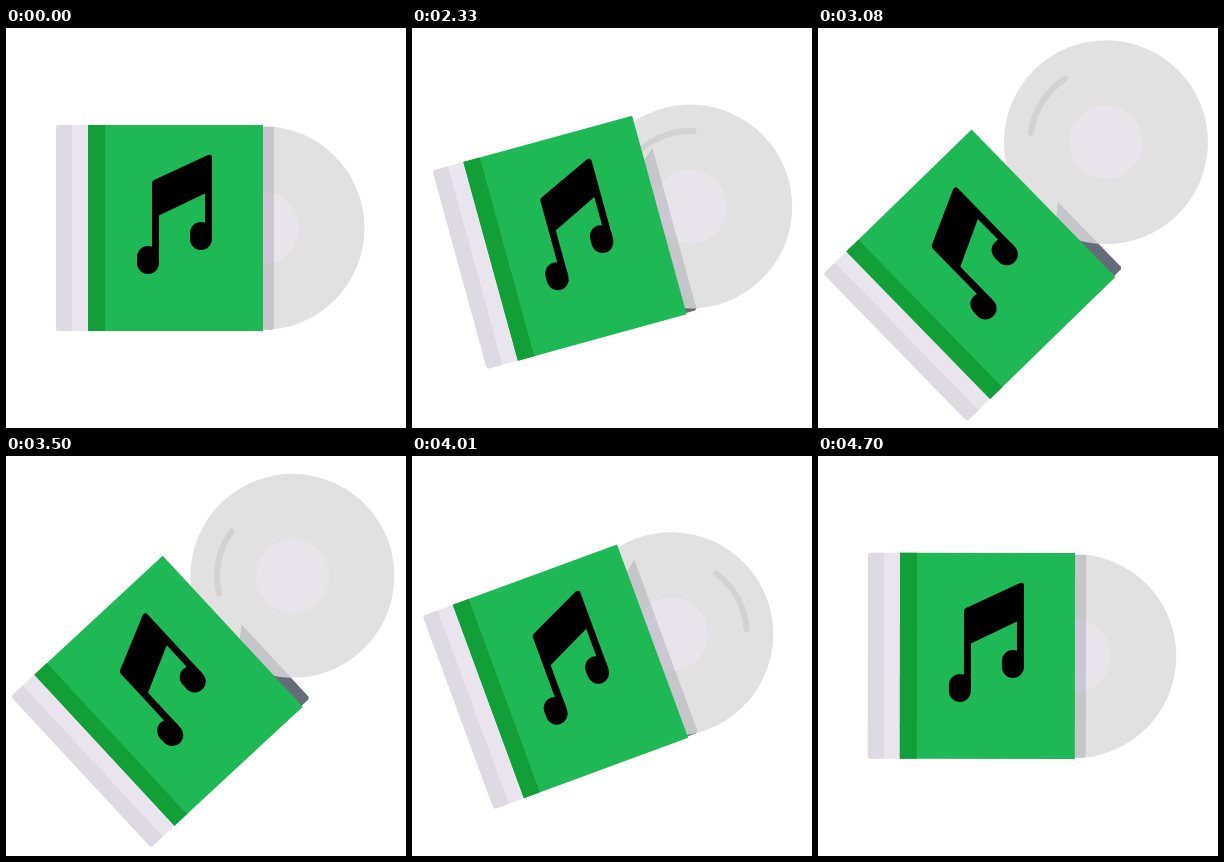
Animation, 400 px wide and 400 px high, one loop 4730 ms. Source, as an HTML page:

```html
<!DOCTYPE html>
<html lang="en">
<head>
<meta charset="utf-8">
<title>Album</title>
<style>
  html, body { margin: 0; width: 100%; height: 100%; overflow: hidden; background: #fff; }
  svg { display: block; width: 100%; height: 100%; }
</style>
</head>
<body>
<svg viewBox="0 0 400 400">
  <g id="album">
    <path id="back" fill="#646b79"/>
    <g id="disc" opacity=".815">
      <circle r="102" fill="#dbdbdb"/>
      <circle r="36.7" fill="#e4dee8"/>
      <path id="shine" d="M75.5 0A75.5 75.5 0 0 1 48.5 57.8" fill="none" stroke="#c9c9c9" stroke-width="6" stroke-linecap="round"/>
    </g>
    <g id="case">
      <path d="M83 97H53q-3 0-3 3V300q0 3 3 3H83Z" fill="#e9e4ed"/>
      <path d="M66 97H53q-3 0-3 3V300q0 3 3 3H66Z" fill="#dfd9e3"/>
      <path d="M82 97H257V303H82Z" fill="#1eb954"/>
      <path d="M82 97H99V303H82Z" fill="#139f37"/>
      <path d="M146 155q0-2 2-3L202 127q4-1 4 3V210h-7V165.500L153 187.500V233h-7Z"/>
      <rect x="131" y="218" width="22" height="28" rx="11"/>
      <rect x="184" y="194" width="22" height="28" rx="11"/>
    </g>
  </g>
</svg>
<script>
const LOOP = 4730;
const times = [2030, 2335, 2540, 2600, 2792, 3110, 3620, 3800, 4160, 4190, 4380, 4730];

// Smooth track through its keys; flat at both ends and at every peak.
function track(values) {
  const slope = i => (values[i + 1] - values[i]) / (times[i + 1] - times[i]);
  const tangents = values.map((_, i) => {
    if (i === 0 || i === values.length - 1) return 0;
    const a = slope(i - 1), b = slope(i);
    return a * b > 0 ? 2 * a * b / (a + b) : 0;
  });
  return t => {
    if (t <= times[0]) return values[0];
    const i = times.findIndex(key => key > t) - 1;
    const span = times[i + 1] - times[i], u = (t - times[i]) / span, v = 1 - u;
    return v * v * ((1 + 2 * u) * values[i] + u * span * tangents[i])
         + u * u * ((1 + 2 * v) * values[i + 1] - v * span * tangents[i + 1]);
  };
}

const tilt = track([0, -15.6, -32.6, -35.4, -41.6, -44.3, -42, -38, -4.1, -1.3, 3.7, 0]);
const discShift = track([0, 25, 51.5, 55, 62.5, 66.4, 58.5, 45.4, -23, -27, -12, 0]);
const caseShift = track([0, -8, -17.3, -18.4, -20.6, -21.4, -20, -16.4, -12.6, -12.5, -6, 0]);
const spin = track([0, 420, 897, 951, 1075, 1127, 1090, 985, 80, 15, 0, 0]);

const place = (id, transform) => document.getElementById(id).setAttribute("transform", transform);

function draw(now) {
  const t = now % LOOP;
  const disc = discShift(t), sleeve = caseShift(t);
  const tip = 89 + 1.37 * (disc - sleeve);
  place("album", `rotate(${tilt(t)} 200 200)`);
  place("disc", `translate(${256.5 + disc} 200)`);
  place("shine", `rotate(${185 + spin(t)})`);
  place("case", `translate(${sleeve} 0)`);
  place("back", `translate(${sleeve} 0)`);
  document.getElementById("back").setAttribute("d",
    `M256 ${Math.max(98, tip + 10)}L268 ${Math.max(99, tip)}V300L266 301.500H256Z`);
  requestAnimationFrame(() => draw(performance.now()));
}
draw(performance.now());
</script>
</body>
</html>
```
